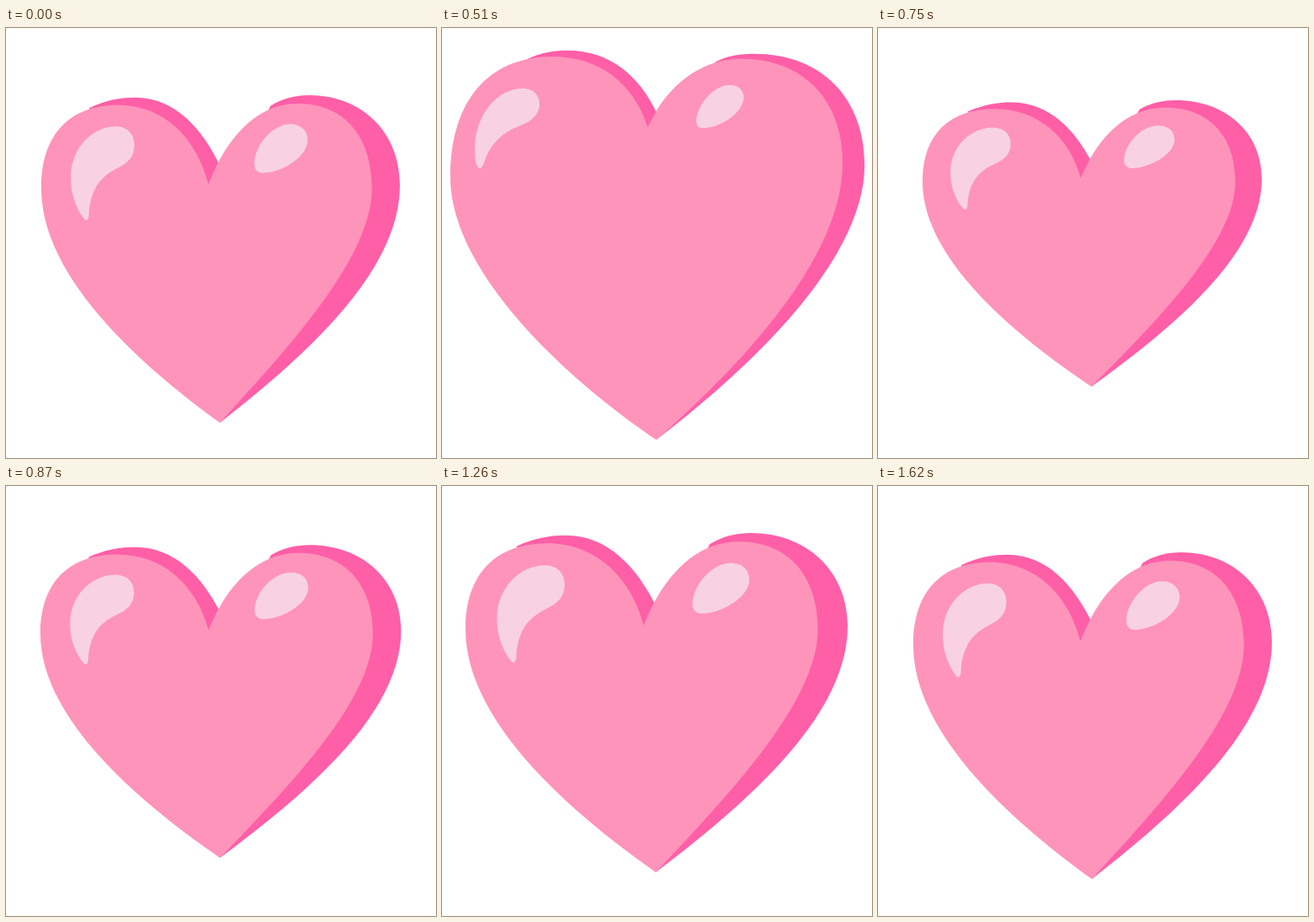
These frames come from a looping animation (512x512 px, 1650 ms). An HTML page:

```html
<!DOCTYPE html>
<html lang="en">
<head>
<meta charset="utf-8">
<title>Beating heart</title>
<style>
  html, body { margin: 0; width: 100%; height: 100%; overflow: hidden; background: #fff; }
  svg { display: block; width: 100%; height: 100%; }
</style>
</head>
<body>
<svg viewBox="0 0 512 512"><g id="heart"></g></svg>
<script>
const LOOP = 1650, STEP = 30;

// Each part has two outlines: turned to the side and facing the viewer.
const parts = [
  { fill: '#ff5fa7',
    side: 'M82 57C105 46 125 43 143 43C196 43 232 84 256 134L270 160L322 54C338 44 355 40 373 40C442 40 493 88 493 158C493 262 390 366 255 470L200 300Z',
    face: 'M100 38C118 29 135 27 150 27C200 27 236 58 256 102L270 130L325 41C340 33 355 31 372 31C452 31 503 84 503 163C503 268 385 391 255 490L200 300Z' },
  { fill: '#ff94bb',
    side: 'M240 157C224 95 180 53 120 53C58 53 19 90 19 162C19 270 130 380 255 470C355 362 456 250 456 162C456 95 420 51 358 51C300 51 261 102 240 157Z',
    face: 'M245 118C228 64 185 34 132 34C56 34 10 86 10 178C10 282 130 405 255 490C375 385 477 265 477 160C477 88 432 37 356 37C308 37 268 68 245 118Z' },
  { fill: '#f8d2e2',
    side: 'M76 203C62 185 58 165 58 148C58 108 88 81 117 81C134 81 142 92 142 105C142 127 126 132 112 140C92 152 84 170 82 195C82 203 79 206 76 203Z',
    face: 'M43 166C39 160 39 152 39 142C40 104 65 72 96 72C109 72 116 80 116 91C115 109 98 114 86 119C66 129 56 142 50 160C48 166 46 168 43 166Z' },
  { fill: '#f8d2e2',
    side: 'M301 134C297 112 322 78 348 78C363 78 371 87 371 99C371 122 335 142 312 142C306 142 302 139 301 134Z',
    face: 'M303 113C301 97 320 68 343 68C353 68 359 74 359 83C358 102 330 119 311 119C306 119 303 117 303 113Z' },
];
const sideBox = [19, 493, 40, 470], faceBox = [10, 503, 27, 490];

// time, left, right, top, bottom, turn towards the viewer
const keys = [
  [0, 42, 469, 80, 470, 0],
  [90, 36, 475, 82, 472, .12],
  [270, 10, 502, 55, 473, .88],
  [390, 6, 506, 36, 484, 1],
  [495, 9, 504, 26.5, 490.5, 1],
  [540, 13, 500, 29, 489, .95],
  [750, 53, 457, 86, 427, 0],
  [1020, 19, 493, 40, 470, 0],
  [1080, 16, 495, 35, 473, 0],
  [1260, 28, 483, 56, 460, 0],
  [1620, 42, 469, 79, 468, 0],
  [LOOP, 42, 469, 80, 470, 0],
];

const mix = (a, b, k) => a + (b - a) * k;

const rate = (i, c) => (keys[i + 1][c] - keys[i][c]) / (keys[i + 1][0] - keys[i][0]);

// Slope at a key: harmonic mean of its neighbours, flat at extremes
function slope(i, c) {
  if (i === 0 || i === keys.length - 1) return 0;
  const a = rate(i - 1, c), b = rate(i, c);
  return a * b <= 0 ? 0 : 2 * a * b / (a + b);
}

function sample(t, c) {
  const i = keys.findIndex((key, n) => t < keys[n + 1][0]);
  const span = keys[i + 1][0] - keys[i][0];
  const u = (t - keys[i][0]) / span, v = 1 - u;
  return keys[i][c] * v * v * (1 + 2 * u) + keys[i + 1][c] * u * u * (3 - 2 * u)
    + span * u * v * (slope(i, c) * v - slope(i + 1, c) * u);
}

function blend(from, to, k) {
  const ends = to.match(/\d+/g);
  let n = 0;
  return from.replace(/\d+/g, x => mix(+x, +ends[n++], k).toFixed(2));
}

const heart = document.getElementById('heart');
for (const part of parts) {
  part.path = document.createElementNS('http://www.w3.org/2000/svg', 'path');
  part.path.setAttribute('fill', part.fill);
  heart.append(part.path);
}

function draw(now) {
  const t = Math.floor(now % LOOP / STEP) * STEP;
  const [left, right, top, bottom, turn] = [1, 2, 3, 4, 5].map(c => sample(t, c));
  const [l, r, tp, b] = sideBox.map((v, i) => mix(v, faceBox[i], turn));
  const sx = (right - left) / (r - l), sy = (bottom - top) / (b - tp);
  heart.setAttribute('transform', `matrix(${sx} 0 0 ${sy} ${left - l * sx} ${top - tp * sy})`);
  for (const { path, side, face } of parts) path.setAttribute('d', blend(side, face, turn));
}

const start = performance.now();
function tick() {
  draw(performance.now() - start);
  requestAnimationFrame(tick);
}
tick();
</script>
</body>
</html>
```
